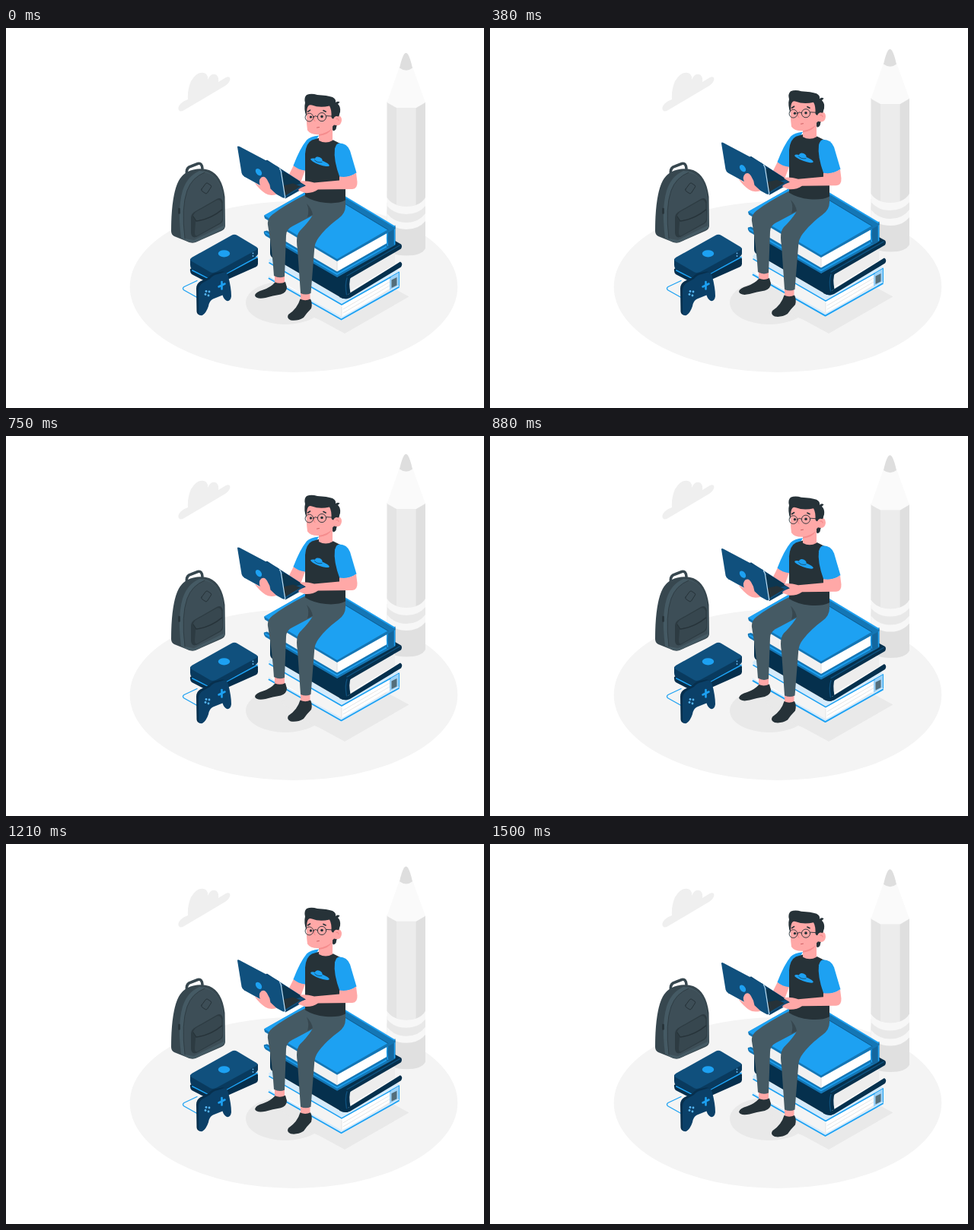
These frames come from a looping animation (628x500 px, 1.54 s). An HTML page:

```html
<!DOCTYPE html>
<html lang="en">
<head>
<meta charset="utf-8">
<title>Studying on books</title>
<style>
html, body { margin: 0; width: 100%; height: 100%; overflow: hidden; background: #fff; }
svg { display: block; width: 100vw; height: 100vh; }
.line { fill: none; stroke-linecap: round; stroke-linejoin: round; }
</style>
</head>
<body>
<svg viewBox="0 0 628 500" preserveAspectRatio="xMidYMid meet">
  <!-- floor and shadows -->
  <ellipse cx="378" cy="340.5" rx="215.3" ry="112.5" fill="#f4f4f4"/>
  <g fill="#e9e9e9">
    <ellipse cx="367" cy="361.5" rx="52" ry="28.5"/>
    <path d="M400 379L412 384L445 402L529.500 353.500L440 305L360 350Z"/>
  </g>
  <path fill="#efefef" d="M227 108Q225 104 230 99Q234 95.500 239 94Q238 82 243 70Q251 57 260 59Q266 61 265 68Q269 59 275 61Q280 63 279 71L289 65Q294 63 294.500 67Q294 72 288 76L234 108Q229 111 227 108Z"/>

  <!-- backpack -->
  <g>
    <path class="line" stroke="#37474f" stroke-width="3.600" d="M237.500 191Q236.500 184 243 182L252 178.500Q257.500 177 258 185"/>
    <path fill="#37474f" d="M217 267Q217 225 225 205Q231 190 246 186.500Q258 184 267 187Q284 194 287.500 222L288 260Q288 265 283 267L249 282Q243 284 236 280L221 274Q217 272 217 267Z"/>
    <path fill="#455a64" d="M230 276Q225 238 232 214Q238 195 254 188Q281 188 285.500 224L287.500 260Q287 264 282 266L249 281.500Q243 283 237 280Z"/>
    <path fill="#3d4e57" d="M235 277Q230 236 238 214Q244 197 261 190Q281 193 285 224L286 260L247 279Z"/>
    <path class="line" stroke="#2f3d44" stroke-width="1" d="M235 277Q230 236 238 214Q244 197 261 190"/>
    <path fill="#2d3b42" d="M243 250Q243 244 249 241L277 225Q283 222 285 229L285 251Q285 256 281 258L250 275Q244 277 243 270Z"/>
    <path fill="#37474f" d="M249 255Q270 252 284 240L284.500 250Q284 255 280 257L251 273.500Q248 274 248 269Z"/>
    <path fill="#37474f" d="M246 247Q248 242 253 240L277 226.500Q282 225 283.500 231V238Q268 251 250 253.500Z"/>
    <path class="line" stroke="#263238" stroke-width="1" d="M246 248L250 254Q268 252 284 239"/>
    <path class="line" stroke="#263238" stroke-width="1" d="M257 212L262.500 204.500Q264 203 266 205L269 207Q270.500 208 269 210L264.500 217Q263 219 261 217L258 215Q256 214 257 212Z"/>
    <path class="line" stroke="#263238" stroke-width="2.600" d="M227.500 238V243.500"/>
  </g>

  <!-- console -->
  <g>
    <path fill="#062f4d" d="M242 317L300 286L331 303V310.500Q331 313 328 314.500L273 339L244 324Q241.500 322 242 317Z"/>
    <path class="line" stroke="#1da1f2" stroke-width="1.800" d="M245 319L272 332.500L330 301.500"/>
    <path fill="#093a5e" d="M242 304L300 275L331 290V297Q331 299 328 301L277 330Q272 332.500 268 330L244 317Q242 315 242 312Z"/>
    <path fill="#10507d" d="M244 302L296 273Q300 270.500 304 273L329 288Q332 290 329 292L277 320.500Q272 323 268 321L244 307Q240.500 305 244 302Z"/>
    <ellipse cx="286.500" cy="296.800" rx="7.700" ry="4.600" fill="#1da1f2"/>
    <g fill="#6cbcf0"><circle cx="324.500" cy="296.500" r=".9"/><circle cx="324.500" cy="300" r=".9"/></g>
    <path class="line" stroke="#1da1f2" stroke-width="1.300" d="M251 332.500L234 340.500Q231 342.500 234 345L251 354.500"/>
    <path fill="#072f4d" d="M250 343Q250 336 256 333L266 328Q270 323 276 322L284 320.500Q288 320 290 324L260 340L257 378Q251 378 250.500 373Z"/>
    <path fill="#0b4068" d="M253 346Q253 338 259 335L268 330Q272 325 278 324L286 321.500Q290 321 292 327Q296 342 296 353Q295 360 290 359Q286 357 284.500 351.500L272 356.500Q267 359 266 366Q263 375 258 378Q253 379 253 374Z"/>
    <path class="line" stroke="#1da1f2" stroke-width="2.600" stroke-linecap="butt" d="M283.500 334V343.500M279.500 340.500L287.500 336.500"/>
    <g fill="#55b4f3"><circle cx="262" cy="350.500" r="1.400"/><circle cx="266" cy="352" r="1.400"/><circle cx="263" cy="346.500" r="1.400"/><circle cx="267" cy="347" r="1.400"/></g>
  </g>

  <g id="lift">
    <!-- pencil -->
    <path fill="#e0e0e0" d="M500.500 240V290Q506 299.500 526 299.500Q546 299.500 551 290V240Z"/>
    <path fill="#f7f7f7" d="M500.500 238V254Q510 265 526 265Q542 265 551 254V238Z"/>
    <path fill="#e8e8e8" d="M500.500 230V244Q510 256 526 256Q542 256 551 244V230Z"/>
    <path fill="#f7f7f7" d="M500.500 215V234Q510 245 526 245Q542 245 551 234V215Z"/>
    <path fill="#e4e4e4" d="M500.500 97H514V233Q505 230 500.500 223Z"/>
    <path fill="#ececec" d="M513 102H539V233Q526 237 513 233Z"/>
    <path fill="#dfdfdf" d="M538.500 102L551 97V223Q547 230 538.500 233Z"/>
    <path fill="#fafafa" d="M517 51L500.500 98L513 105H539L551 98L534 51Z"/>
    <path fill="#dedede" d="M517 52.500Q520 39 523 34.500Q525.500 31 528 34.500Q531 39 534 52.500Q526 59 517 52.500Z"/>

    <!-- bottom book -->
    <path fill="#fff" d="M349 309L441 360L512 322V338L441 382L349 328Z"/>
    <path fill="#f4f4f4" d="M349 309L441 364V381L349 326Z"/>
    <path class="line" stroke="#e0e0e0" stroke-width=".8" d="M441 367V379M443 370L504 334M443 375L504 339"/>
    <path fill="#d5ebfb" d="M345 305L349 302L441 356L514 318L517.500 321L441 365L346 309Z"/>
    <path fill="#9dd2f7" d="M504 327.500L517 320.500V340L504 347Z"/>
    <path fill="#546e7a" d="M506.500 331.500L513.500 328V338.500L506.500 342Z"/>
    <path fill="#d5ebfb" d="M344.500 326L441 380L516.500 338L517 342L441 385L346 330Z"/>
    <g class="line" stroke="#1da1f2">
      <path stroke-width="1.600" d="M346 309L441 364L505 328"/>
      <path stroke-width="1" d="M504.500 328L516.500 321V339.500"/>
      <path stroke-width="1.800" d="M345.500 329.500L440.500 383.500L516 341"/>
    </g>

    <!-- middle book -->
    <path fill="#fff" d="M449 329L510 293V314L449 349Z"/>
    <path fill="#ededed" d="M452 329L511 295V311L452 346Z"/>
    <path fill="#05304d" d="M347 275L449 326V356Q443 357 438 353.500L350 302Q347 300 347 296Z"/>
    <path fill="#05304d" d="M360 270L434 310L502 275L519 284.500Q521 287 519 290.500L451 330Q445 333 440 329Z"/>
    <path class="line" stroke="#0f507c" stroke-width="1.400" d="M448 326L517 286"/>
    <path fill="#05304d" d="M438 351Q446 354 453 348L518 307.500Q522 309.500 519 314.500L452 355Q445 358 438 354Z"/>
    <path fill="#05304d" d="M440 327L453 327Q450 335 452.500 349L440 354Z"/>
    <path class="line" stroke="#0f507c" stroke-width="1.400" d="M448 329Q445 338 447.500 351"/>

    <!-- top book -->
    <g transform="translate(0 .5)">
      <path fill="#f1f1f1" d="M341 248L435 302V326L341 270Z"/>
      <path fill="#fff" d="M435 303L505 262V287L435 327Z"/>
      <path class="line" stroke="#dedede" stroke-width="1" d="M435 306V321"/>
      <path fill="#1476b5" d="M339 267L343 266L435 320L505 280L511.500 282V285L435 327.500L341 273Q338 270 339 267Z"/>
      <path class="line" stroke="#1da1f2" stroke-width="1.800" d="M341 269L435 323.500L507 283"/>
      <path fill="#13679f" d="M500 265L511.500 259V283Q507 290 500 288Z"/>
      <path class="line" stroke="#1da1f2" stroke-width="1.400" d="M510.500 263V284M501.500 267Q499.500 276 501.500 286"/>
      <path fill="#1476b5" d="M339 246.500L415 203L511.500 261V263.500L435 306.500L340 250Z"/>
      <path fill="#1da1f2" d="M339 246L415 203L432 213L503 264L435 303.500Z"/>
      <path fill="#1476b5" d="M430 214L446 223L511 261L502 265.500L430 222Z"/>
      <path class="line" stroke="#1da1f2" stroke-width="1.800" d="M436 216L510 260.500"/>
      <path class="line" stroke="#0f5f95" stroke-width="1" d="M436 225L502 265"/>
    </g>

    <!-- legs -->
    <g fill="#ffa8a7">
      <path d="M353 324H366V337Q359 340 353 336Z"/>
      <path d="M387 345H399.500V359Q393 362 387 358Z"/>
    </g>
    <g fill="#263238">
      <path d="M353.500 334.500Q360 337.500 367 334L369 341Q369 348 361 350.500Q350 352 341 355Q329 357.500 327 352Q328 347 338 344.500Q348 341 353.500 334.500Z"/>
      <path d="M386.500 356.500Q393 360 400 356.500Q403 362 401 369Q395 375 391 381Q383 386 374 384.500Q368 382 371 377Q383 369 386.500 356.500Z"/>
    </g>
    <path fill="#455a64" d="M394 219Q366 233 350 245.500Q343 251 344 259Q350 294 352 326Q359 330 366 327L368 273Q368 265 376 261L410 243L420 222Z"/>
    <path fill="#37474f" d="M395 231Q399 240 396 249L404 245L403 236Z"/>
    <path fill="#455a64" d="M396 221Q420 230 446 222V234Q446 244 437 250.500Q420 263 411 275.500Q405 283 405 293L400.500 349Q394 352 387 349L383 291Q380 274 386 267Q398 255 403 246Q402 238 395 231Z"/>

    <g transform="translate(0 .6)">
      <!-- far arm and torso -->
      <path fill="#ffa8a7" d="M379 178L371.500 193L387 203L394 184Z"/>
      <path fill="#1da1f2" d="M411 141Q400 142 395 147Q386 158 377.500 180.500Q384 186 393 187L400 160Z"/>
      <path fill="#263238" d="M393 165Q394 151 402 147L412 144L430 147L440 152L446 196V226Q436 231 420 229.500Q404 228 393 221Z"/>
      <path fill="#1da1f2" d="M438 151Q448 151 452 161L460.500 190Q451 197 438.500 196Q430 173 432 158Q434 151 438 151Z"/>
      <ellipse cx="412.500" cy="176.200" rx="13" ry="3.100" transform="rotate(20 412.500 176.200)" fill="#1da1f2"/>
      <ellipse cx="410.800" cy="172.500" rx="5" ry="3.400" transform="rotate(20 410.800 172.500)" fill="#1da1f2"/>
      <path class="line" stroke="#16435f" stroke-width=".8" d="M405.500 173Q408 177 415 176"/>

      <!-- head -->
      <path fill="#263238" d="M428 111H438L437 120L434 130Q434 134 430 135L427 130Z"/>
      <path fill="#ffa8a7" d="M395 100Q394 120 396 134Q400 140 411 139.500V147.500Q420 152.500 429 147.500V129L431 127Q440 130 441 121Q441 114 435 114.500Q431 115 430 119L428 118V98H396Z"/>
      <path fill="#f58c8d" d="M411 139.500Q421 138 428 132Q424 140 411 141.500Z"/>
      <path fill="#263238" d="M393 98Q391 91 395 87.500Q401 85 409 87.500Q422 88 429 90.500Q434 93 433 97.500Q436 95 438.500 97L436 99.500Q440 103 439 110L437 116Q432 114 430 119L427.500 117Q428 107 425 102Q412 105 402 101Q397 99 395.500 106L394.500 116Q391 105 393 98Z"/>
      <path class="line" stroke="#263238" stroke-width="1.700" d="M396.500 109.500L399.500 107.500M417 108L420 109.500"/>
      <path class="line" stroke="#f28182" stroke-width="1" d="M406 116Q403 121 406 122M434 119Q437 118 437 121"/>
      <g fill="#263238"><circle cx="400.500" cy="116.500" r="1.700"/><circle cx="415" cy="116" r="1.800"/></g>
      <g class="line" stroke="#263238" stroke-width=".9">
        <circle cx="398.500" cy="117" r="5.400"/><circle cx="415" cy="116.500" r="5.600"/>
        <path d="M404 116Q406.500 114 409.300 116M420.700 115L428.500 115.500"/>
      </g>
      <path class="line" stroke="#c9585c" stroke-width=".9" d="M408.500 130.500L411.500 130"/>

      <!-- laptop and hands -->
      <path fill="#10507d" d="M340 175L343 173L394 206Q395 208 392 210L367 224L358 185Z"/>
      <path fill="#0c3650" d="M361 190L366 189L389 203.500L366 211Z"/>
      <path fill="#263238" d="M364 207L377 204L387 208L367 220Z"/>
      <path class="line" stroke="#07304f" stroke-width="1" d="M342 174L393 206.500L367 223"/>
      <path fill="#ffa8a7" d="M460 190L461.500 202Q462 211 455 211.500L410 212Q403 217 393 216.500L385 213.500Q382 212 389 209L394 207L386 202Q390 199 405 203L438 200V195Q451 197 460 190Z"/>
      <path fill="#10507d" d="M304 156Q304 154 307 155.500L357 182Q360 184 361 187L366.500 222Q366 224 363 222.500L313 195Q310 193 309.500 190Z"/>
      <path class="line" stroke="#b9dcf3" stroke-width="1.200" d="M359.500 184.500Q361 186 361.500 189L366.800 222.500"/>
      <ellipse cx="332" cy="189" rx="3.400" ry="5.200" transform="rotate(-38 332 189)" fill="#1da1f2"/>
      <path fill="#ffa8a7" d="M326.500 203L334 207Q331 200 335.500 196Q340 193.500 343 199Q347 205 347.500 211L355.500 218.500Q346 221 340.500 217Q333 212 326.500 203Z"/>
    </g>
  </g>
</svg>
<script>
const LOOP = 1540, PEAK = 729, SPEED = 0.0128;
const lift = document.getElementById('lift');

// constant-speed rise, then fall
function draw(t) {
  const y = SPEED * (Math.abs(t - PEAK) - PEAK);
  lift.setAttribute('transform', `translate(0 ${y.toFixed(3)})`);
}

const start = performance.now();
function tick() {
  draw((performance.now() - start) % LOOP);
  requestAnimationFrame(tick);
}
draw(0);
requestAnimationFrame(tick);
</script>
</body>
</html>
```
